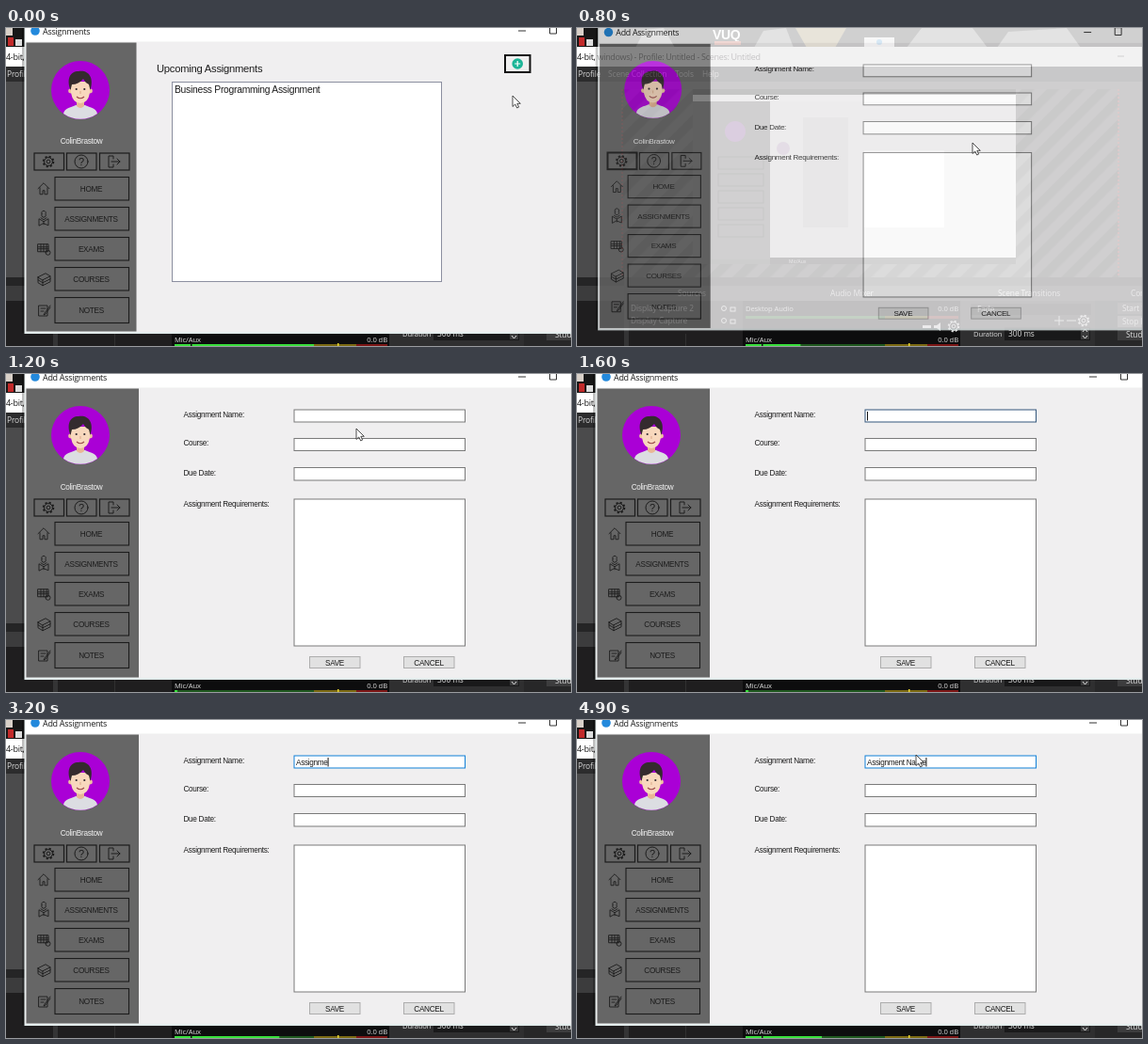
Write an HTML page that moves like this. It is 600 px wide and 338 px high and loops after 5 s.

```html
<!DOCTYPE html>
<html lang="en">
<head>
<meta charset="utf-8">
<title>Add assignment</title>
<style>
html, body { margin: 0; width: 100%; height: 100%; overflow: hidden; background: #1f1e1f; }
svg { display: block; width: 100vw; height: 100vh; }
text { font: 8.2px "Liberation Sans", Arial, sans-serif; letter-spacing: -.3px; fill: #1c1c1c; white-space: pre; }
.ui { font: 9px "Open Sans", "Noto Sans", sans-serif; letter-spacing: -.3px; }
.dock { font: 8.4px "Open Sans", "Noto Sans", sans-serif; letter-spacing: -.1px; fill: #dcdcdc; }
.small { font-size: 7.6px; }
.head { font-size: 11.2px; letter-spacing: -.23px; }
.item { font-size: 10.3px; letter-spacing: -.26px; }
.mid { text-anchor: middle; }
.end { text-anchor: end; }
.line { fill: none; stroke: #1c1c1c; stroke-width: 1; stroke-linecap: round; stroke-linejoin: round; }
</style>
</head>
<body>
<svg id="stage" viewBox="0 0 600 338" preserveAspectRatio="none"></svg>
<script>
const LOOP = 5000, STEP = 100, SWAP = 800, FOCUS = 1300;
const PHRASE = "Assignment Name";
const KEYS = [1900, 2100, 2300, 2500, 2700, 2900, 3050, 3150, 3400, 3600, 3800, 4100, 4300, 4500, 4700];
const PATH = [[0, 538, 72], [700, 436, 119], [800, 420, 122], [900, 412, 125], [1200, 372, 58]];

const rect = (x, y, w, h, fill, more = "") =>
  `<rect x="${x}" y="${y}" width="${w}" height="${h}" fill="${fill}" ${more}/>`;
const box = (x, y, w, h, fill, stroke, sw = 1, more = "") =>
  rect(x, y, w, h, fill, `stroke="${stroke}" stroke-width="${sw}" ${more}`);
const text = (x, y, s, cls = "", more = "") => `<text x="${x}" y="${y}" class="${cls}" ${more}>${s}</text>`;
const path = (d, more = 'class="line"') => `<path d="${d}" ${more}/>`;
const circle = (x, y, r, more) => `<circle cx="${x}" cy="${y}" r="${r}" ${more}/>`;
const at = (x, y, body) => `<g transform="translate(${x} ${y})">${body}</g>`;

function gear(color) {
  return circle(0, 0, 5.3, `fill="none" stroke="${color}" stroke-width="2" stroke-dasharray="2.1 2.06"`) +
    circle(0, 0, 4.4, `fill="none" stroke="${color}"`) + circle(0, 0, 1.9, `fill="none" stroke="${color}"`);
}

// The captured screen, nested inside the studio's preview.
function preview() {
  let s = rect(123, 65, 343, 186, "#4a4a4a") + rect(123, 65, 343, 6, "#222") + rect(123, 71, 343, 7, "#eee") +
    rect(143, 78, 62, 168, "#555") + rect(205, 78, 261, 168, "#e2e2e2") + rect(240, 95, 48, 117, "#cacaca") +
    rect(305, 130, 85, 82, "#fff") + rect(205, 244, 261, 7, "#2b2b2b") +
    circle(168, 110, 11, 'fill="#8b4aa0"') + circle(219, 128, 7, 'fill="#b695c0"') +
    text(225, 250, "Mic/Aux", "dock", 'style="font-size:5px"');
  for (let i = 0; i < 5; i++) s += box(150, 137 + i * 18, 48, 13, "#555", "#222", .8);
  return s;
}

// Desktop and recording studio behind the window.
function desktop() {
  let s = rect(0, 0, 600, 21, "#171717") + rect(0, 0, 7, 8, "#d8d0c8") + rect(2, 10, 6, 9, "#c22a2a") +
    rect(10, 12, 7, 7, "#ddd") + text(144, 12, "VUQ", "", 'style="font-size:14px;font-weight:700;fill:#fff"') +
    rect(146, 14, 28, 4, "#b8402e") + path("M62 21L72 2L92 0L104 21Z", 'fill="#777"') +
    path("M188 21L198 3L222 0L230 21Z", 'fill="#777"') + path("M232 0H286L274 21H244Z", 'fill="#8c7948"') +
    rect(305, 10, 32, 11, "#d9d9d9") + circle(321, 15, 3, 'fill="#3c91d0"') +
    path("M350 21L366 0H420L436 21ZM446 21L458 4L520 0L535 21Z", 'fill="#777"');
  s += rect(0, 20, 600, 21, "#fff") + text(0, 34, "4-bit, windows) - Profile: Untitled - Scenes: Untitled", "ui") +
    path("M574 30H581", 'stroke="#555"');
  s += rect(0, 41, 600, 24, "#2c2c2d") + text(1, 52, "Profile", "dock") +
    text(33, 52, "Scene Collection", "dock") + text(104, 52, "Tools", "dock") + text(133, 52, "Help", "dock");
  s += rect(0, 57, 600, 209, "#4b4b4c") + rect(48, 65, 527, 200, "url(#stripes)") +
    path("M48 65V265M575 65V265", 'stroke="#e03030" stroke-dasharray="2 2"') + preview();
  s += rect(0, 265, 600, 73, "#252526") + rect(0, 274, 600, 16, "#3c3c3d") + rect(0, 290, 176, 48, "#1f1e1f") +
    rect(50, 265, 5, 73, "#343435") + rect(115, 325, 1, 13, "#303030");
  [[122, "Sources"], [292, "Audio Mixer"], [480, "Scene Transitions"], [604, "Controls"]]
    .forEach(([x, label]) => s += text(x, 285, label, "dock mid"));
  s += text(57, 301, "Display Capture 2", "dock") + text(57, 314, "Display Capture", "dock");
  [298, 311].forEach(y => s += circle(156, y, 2.5, 'fill="none" stroke="#ddd"') + box(163, y - 1, 5, 4, "none", "#ddd"));
  s += rect(176, 290, 231, 48, "#0d0d0e") + text(179, 301, "Desktop Audio", "dock small") + text(405, 301, "0.0 dB", "dock small end") +
    rect(179, 306, 148, 3, "#1d5a1d") + rect(327, 306, 45, 3, "#6b6018") + rect(372, 306, 33, 3, "#6b1818") +
    rect(367, 316, 9, 3, "#ddd") + path("M379 316H382L386 313V322L382 319H379Z", 'fill="#ddd"') + at(400, 317, gear("#ddd")) +
    text(179, 334, "Mic/Aux", "dock small") + text(405, 334, "0.0 dB", "dock small end");
  s += rect(407, 290, 193, 48, "#2f2f30") + rect(418, 293, 128, 12, "#1b1b1c") + text(425, 302, "Fade", "dock") +
    path("M507 311H517M512 306V316M520 311H530", 'stroke="#ddd"') + at(538, 311, gear("#ddd")) +
    text(421, 328, "Duration", "dock small") + rect(454, 318, 91, 14, "#19191a") + text(458, 328, "300 ms", "dock") +
    rect(535, 319, 9, 12, "#3b3b3c") + path("M537 323L539.5 320L542 323M537 327L539.5 330L542 327", 'fill="none" stroke="#ddd"') +
    rect(550, 290, 50, 48, "#272728");
  ["Start Streaming", "Stop Recording", "Studio Mode"].forEach((label, i) =>
    s += rect(574, 292 + i * 14, 30, 12, i === 1 ? "#555" : "#3d3d3e") + text(579 + (i > 1 ? 4 : 0), 301 + i * 14, label, "dock"));
  return s;
}

function meter() {
  return rect(176, 335, 231, 3, "#0d0d0e") + rect(179, 336, 148, 2, "#1f591f") + rect(327, 336, 45, 2, "#7c6a12") +
    rect(372, 336, 33, 2, "#7d1616") + rect(179, 336, 3, 2, "#38e03c", 'id="level"') +
    rect(352, 335, 1.5, 3, "#e8d532") + rect(196, 335, 1.5, 3, "#111", 'id="mark"');
}

function avatar() {
  return circle(0, 0, 31, 'fill="#aa00d6"') +
    path("M-18 25C-17 19 -9 18 -5 16H5C9 18 17 19 18 25A31 31 0 0 1 -18 25Z", 'fill="#dcdde2"') +
    path("M-4 10H4V17Q0 21 -4 17Z", 'fill="#e9b795"') +
    circle(-10.5, 1, 2.4, 'fill="#efc2a0"') + circle(10.5, 1, 2.4, 'fill="#efc2a0"') +
    path("M-10 -9H10V3Q8 14 0 14Q-8 14 -10 3Z", 'fill="#f8d8bd"') +
    path("M-10.5 0C-15 -12 -11 -20 -2 -20C8 -22 15 -14 10.5 0L9 -6Q5 -8 3 -12Q-2 -6 -9 -6Z", 'fill="#342b2e"') +
    circle(-4.3, -1, 1.1, 'fill="#332b30"') + circle(4.3, -1, 1.1, 'fill="#332b30"') +
    path("M0 1V4", 'stroke="#dba98a"') + path("M-4 7Q0 10.5 4 7", 'fill="none" stroke="#9c4b4b" stroke-width="1.1"');
}

const ICONS = [
  "M-6 0L0 -6L6 0M-4 -1V6H-1V2H1V6H4V-1",
  "M-2 -5A2.3 2.3 0 1 0 2 -5A2.3 2.3 0 1 0 -2 -5M-5 7V0L0 3L5 0V7L0 5ZM0 3V6M-3 -1L0 1L3 -1",
  "M-6 -5H5V3H-6ZM-6 -2H5M-6 0H5M-3 -5V3M0 -5V3M3 -5V3M2 4A2.5 2.5 0 1 0 7 4A2.5 2.5 0 1 0 2 4",
  "M-6 -2L2 -6L7 -3L-1 1ZM-6 -2V1L-1 4L7 0M-6 1V4L-1 7L7 3V-3M-1 1V7",
  "M-5 -5H4V6H-5ZM-3 -2H2M-3 1H0M7 -5L1 3L0 5L2 4L7 -3"
];

function sidebar(right, dy) {
  let s = rect(21.5, 15.5, right - 21.5, 307, "#666") + at(79, 66 + dy, avatar()) +
    text(80, 123, "ColinBrastow", "mid", 'style="fill:#f2f2f2"');
  [30, 64.5, 99.5].forEach((x, i) => s += box(x, 133, 31.5, 18, "#666", "#1c1c1c", 1.2, i ? "" : 'class="gear"'));
  s += at(45, 142, gear("#1c1c1c")) + circle(80, 142, 7, 'class="line"') +
    text(80, 146, "?", "mid", 'style="font-size:11px;letter-spacing:0"') +
    path("M114 139V136H109V148H114V145M112 142H121M118 139L121 142L118 145");
  ["HOME", "ASSIGNMENTS", "EXAMS", "COURSES", "NOTES"].forEach((label, i) => {
    const y = 158.5 + 32 * i + dy, h = i === 4 ? 27 : 24.5;
    s += box(52, y, 78.5, h, "#666", "#1c1c1c", 1.1) + text(90.5, y + h / 2 + 2.8, label, "mid") +
      at(40, y + h / 2, path(ICONS[i], 'class="line" style="stroke-width:.9"'));
  });
  return s;
}

function frame(title, right, dy) {
  return rect(17, -20, 3, 344, "#000", 'opacity=".25"') + rect(19.5, -20, 640, 345, "#e3ecec") +
    rect(20.5, -20, 640, 36, "#fff") + rect(20.5, 14.5, 640, 308.5, "#f0eff0") + circle(31, 3, 4.8, 'fill="#2389dc"') +
    `<g class="caption">${text(39, 6.5, title, "ui")}${path("M544 3H552M577.5 -2H584.5V6H577.5Z", 'fill="none" stroke="#333"')}</g>` +
    sidebar(right, dy);
}

function listWindow() {
  return frame("Assignments", 138.5, 0) + text(160, 46.5, "Upcoming Assignments", "head") +
    box(176.5, 57.5, 286, 212, "#fff", "#8c8fa0") + text(179, 68.5, "Business Programming Assignment", "item") +
    box(530, 29, 26.5, 18, "#efefef", "#111", 2) + circle(543.2, 38, 5.8, 'fill="#1bb597"') +
    path("M540.2 38H546.2M543.2 35V41", 'stroke="#fff" stroke-width="1.2"');
}

function formWindow() {
  let s = frame("Add Assignments", 141, -1);
  [["Assignment Name:", 45.5, 38, 13], ["Course:", 76, 68.5, 13], ["Due Date:", 108, 99.5, 13.5], ["Assignment Requirements:", 140.5, 133, 156]]
    .forEach(([label, y, top, h], i) =>
      s += text(188.5, y, label) + box(306, top, 181.5, h, "#fff", "#7a7a7a", 1, i ? "" : 'id="field"'));
  [[322.5, "SAVE"], [422.5, "CANCEL"]].forEach(([x, label]) =>
    s += box(x, 300.5, 53.5, 12, "#e1e1e1", "#adadad") + text(x + 26.5, 309.8, label, "mid"));
  return s + text(308, 47.5, "", "", 'id="typed"') + rect(308, 40, 1, 9.5, "#111", 'id="caret"');
}

const stage = document.getElementById("stage");
stage.innerHTML =
  `<defs><pattern id="stripes" width="19" height="19" patternUnits="userSpaceOnUse" patternTransform="rotate(45)">
  ${rect(0, 0, 19, 19, "#505050")}${rect(0, 0, 9.5, 19, "#363636")}</pattern></defs>` +
  desktop() + meter() + `<g id="list">${listWindow()}</g><g id="form">${formWindow()}</g>` +
  `<g id="pointer">${path("M0 0V11.5L2.7 9L4.7 13L6.6 12.1L4.8 8.3H8.3Z", 'fill="#fff" stroke="#222" stroke-width=".8"')}</g>`;

const $ = id => document.getElementById(id);
const show = (el, on) => el.setAttribute("visibility", on ? "visible" : "hidden");
const [list, form, field, typed, caret, pointer, level, mark] =
  ["list", "form", "field", "typed", "caret", "pointer", "level", "mark"].map($);
const listCaption = list.querySelector(".caption"), formGear = form.querySelector(".gear");

function pointerAt(t) {
  if (t >= 4900) return [360, 37];
  if (t > 1200) return null;
  const i = Math.max(1, PATH.findIndex(p => p[0] >= t));
  const [a, b] = [PATH[i - 1], PATH[i]], k = (t - a[0]) / (b[0] - a[0]);
  return [a[1] + (b[1] - a[1]) * k, a[2] + (b[2] - a[2]) * k];
}

// Each sound peaks, then falls at a steady rate.
function levelAt(t, count) {
  if (t < 850) return 327 - .112 * t;
  if (!count) return 182;
  const peak = count === 8 ? 296 : 283 + 14 * Math.sin((count - 15) * 1.7);
  return Math.max(182, peak - .115 * (t - KEYS[count - 1]));
}

function draw(t) {
  const isForm = t >= SWAP;
  list.style.display = isForm ? "none" : "";
  form.style.display = isForm ? "" : "none";
  listCaption.setAttribute("opacity", t >= 600 ? .5 : 1);

  const scale = t < 900 ? .984 : t < 1000 ? .997 : 1;
  form.setAttribute("opacity", t < 900 ? .8 : t < 1000 ? .95 : 1);
  form.setAttribute("transform", `translate(185 100) scale(${scale}) translate(-185 -100)`);
  formGear.setAttribute("stroke-width", t < 1000 ? 2 : 1.2);

  const count = KEYS.filter(k => k <= t).length;
  const since = t - (count ? KEYS[count - 1] : FOCUS);
  typed.textContent = PHRASE.slice(0, count);
  field.setAttribute("stroke", t < FOCUS ? "#7a7a7a" : count ? "#1180d8" : "#34577c");
  if (isForm) caret.setAttribute("x", 308 + (count ? typed.getComputedTextLength() : 0));
  caret.style.display = t >= FOCUS && since % 1060 < 530 ? "" : "none";

  const pos = pointerAt(t);
  show(pointer, pos);
  if (pos) pointer.setAttribute("transform", `translate(${pos})`);

  const end = levelAt(t, count);
  level.setAttribute("width", end - 179);
  show(mark, end > 200);
}

function tick(now) {
  draw(Math.floor(now % LOOP / STEP) * STEP);
  requestAnimationFrame(tick);
}
draw(0);
requestAnimationFrame(tick);
</script>
</body>
</html>
```
